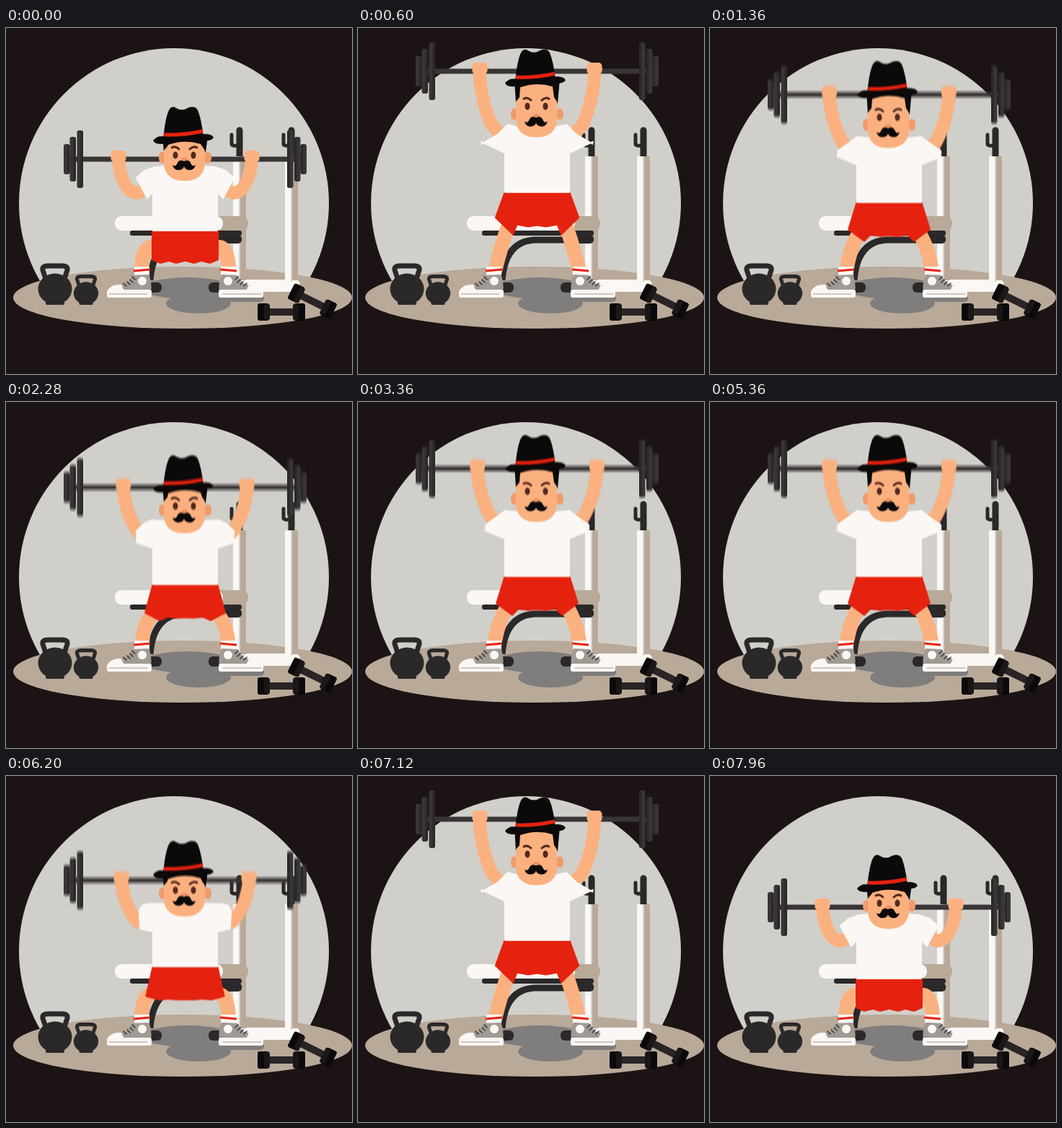
Write an HTML page with a canvas that moves like this. It is 480x480 px and loops after 8000 ms.

```html
<!DOCTYPE html>
<html lang="en">
<head>
<meta charset="utf-8">
<title>Shoulder press</title>
<style>
  html, body { margin: 0; width: 100%; height: 100%; overflow: hidden; background: #1c1314; }
  canvas { display: block; width: 100vw; height: 100vh; }
</style>
</head>
<body>
<canvas id="stage" width="480" height="480"></canvas>
<script>
const SIZE = 480, PERIOD = 2000, STEP = 40, SHUTTER = 20, SAMPLES = 8;
const MOVE = 545, DROP_START = 1176, TRAVEL = 122, AXIS = 248.5;
const C = {
  night: '#1c1314', wall: '#d1cfc9', floor: '#b8a999', shadow: '#807d7d', white: '#fbf7f4',
  iron: '#2b2829', plate: '#393435', black: '#0c090a', skin: '#fbb17f', red: '#e5220f',
  shoe: '#a09a94', brown: '#54281f'
};

const out = document.getElementById('stage').getContext('2d');
const newLayer = () => {
  const canvas = document.createElement('canvas');
  canvas.width = canvas.height = SIZE;
  return canvas.getContext('2d');
};
const backdrop = newLayer(), layer = newLayer();
let g = backdrop;

// Drawing helpers
const fill = (color, d) => { g.fillStyle = color; g.fill(new Path2D(d)); };
const line = (color, width, d, cap = 'round') => {
  g.strokeStyle = color; g.lineWidth = width; g.lineCap = cap; g.lineJoin = 'round';
  g.stroke(new Path2D(d));
};
const oval = (color, x, y, rx, ry = rx, turn = 0) => {
  g.fillStyle = color; g.beginPath(); g.ellipse(x, y, rx, ry, turn, 0, 7); g.fill();
};
const box = (color, x, y, w, h, r = 0) => {
  g.fillStyle = color; g.beginPath(); g.roundRect(x, y, w, h, r); g.fill();
};
const placed = (x, y, turn, draw) => {
  g.save(); g.translate(x, y); g.rotate(turn); draw(); g.restore();
};
const bothSides = draw => {
  draw();
  g.save(); g.translate(2 * AXIS, 0); g.scale(-1, 1); draw(); g.restore();
};

// Motion: a quick press, a hold, a quick drop, a short rest
const smooth = x => { x = Math.min(1, Math.max(0, x)); return x * x * (3 - 2 * x); };
const lift = t => {
  t = (t + PERIOD) % PERIOD;
  return smooth(t / MOVE) - smooth((t - DROP_START) / MOVE);
};

// Blends three key poses: resting, part way and nearly up
const MID = 0.31, HIGH = 0.73;
const blend = (k, low, mid, high) => {
  const [a, b, f] = k < MID ? [low, mid, k / MID] : [mid, high, (k - MID) / (HIGH - MID)];
  return a.map((v, i) => v + (b[i] - v) * f);
};
const mirrored = p => {
  const pts = [];
  for (let i = 0; i < p.length; i += 2) pts.push([p[i], p[i + 1]]);
  const other = pts.map(([x, y]) => [2 * AXIS - x, y]).reverse();
  return 'M' + pts.concat(other).map(q => q.join(' ')).join('L') + 'Z';
};

function kettlebell(x, y, s) {
  placed(x, y, 0, () => {
    g.scale(s, s);
    line(C.iron, 7, 'M-13 -14 L-17 -26 Q-18 -32 -10 -32 L10 -32 Q18 -32 17 -26 L13 -14');
    oval(C.iron, 0, 0, 23.5, 21.5);
    box(C.iron, -13, 14, 26, 8, 2);
  });
}

function dumbbell(x, y, turn) {
  placed(x, y, turn, () => {
    box('#292425', -19, -5, 38, 10);
    for (const side of [-1, 1]) {
      box(C.black, side * 25 - 8, -12, 16, 24, 3);
      box('#1b1718', side * 20 - 4, -11, 8, 22, 2);
    }
  });
}

function post(x) {
  line(C.iron, 9, `M${x + 9} 142 V180`);
  line(C.iron, 5, `M${x - 2} 148 V161 Q${x - 2} 164 ${x + 8} 163`);
  box(C.white, x, 178, 9, 174);
  box('#d8d3cb', x + 8, 178, 2, 174);
  box(C.floor, x + 10, 178, 8, 172);
}

function drawBackdrop() {
  box(C.night, 0, 0, SIZE, SIZE);
  g.save();
  g.beginPath(); g.rect(0, 0, SIZE, 374); g.clip();
  oval(C.wall, 233, 243, 215);
  g.restore();
  oval(C.floor, 245, 374, 235, 43);
  oval(C.shadow, 252, 361, 64, 15);
  oval(C.shadow, 267, 382, 45, 14);
  box(C.shadow, 300, 369, 58, 11, 5);

  fill(C.white, 'M318 349 H404 L408 354 L397 366 H345 Z');
  post(315);
  post(387);

  box(C.floor, 285, 261, 51, 20, 9);
  box(C.white, 151, 261, 150, 20, 9);
  line(C.iron, 9, 'M200 350 Q204 296 245 294 H304', 'butt');
  box(C.iron, 172, 281, 155, 7, 3);
  box(C.iron, 294, 287, 33, 12, 5);

  kettlebell(68, 362, 1);
  kettlebell(111, 368, 0.73);
  dumbbell(382, 394, 0);
  dumbbell(425, 379, 0.46);
  bothSides(() => box(C.iron, 186, 353, 30, 14, 6));
}

function barbell(y) {
  box(C.plate, 84, y - 3.5, 328, 7);
  bothSides(() => {
    [[80, 42], [88.5, 62], [98.5, 80]].forEach(([x, h]) => {
      box(C.plate, x, y - h / 2, 8.5, h, 3);
      box(C.iron, x + 5, y - h / 2 + 1, 3.5, h - 2, 2);
    });
  });
}

function shoe() {
  box(C.white, 178, 331, 21, 16);
  line(C.red, 3, 'M177 337 L200 335', 'butt');
  fill(C.shoe, 'M176 343 L198 342 Q203 352 201 367 H146 Q158 356 168 354 Z');
  fill(C.white, 'M141 364 Q146 355 160 356 L164 365 Z');
  box(C.white, 140, 363, 62, 11, 3);
  line(C.shoe, 1, 'M143 369 H196');
  line('#3c3838', 1.6, 'M175 345 l4 4 M172 349 l4 4 M168 352 l4 4 M163 354 l4 4');
  oval(C.white, 189, 351, 6);
}

function head(chin, eyes, hat) {
  const brow = 158 + hat, cheek = 190 + chin;
  bothSides(() => oval('#f19a6b', 217, 180 + chin, 5, 8));
  fill(C.black, `M217 ${brow - 8} H280 L277 ${172 + eyes} H219 Z`);
  fill(C.skin, `M219 ${170 + eyes} L224 ${164 + eyes} L225 ${brow + 4} Q248 ${brow - 4} 270 ${brow + 3}
    L272 ${164 + eyes} L276 ${170 + eyes} V${cheek} Q273 ${212 + chin} 247.5 ${212 + chin}
    Q222 ${212 + chin} 219 ${cheek} Z`);
  for (const side of [-1, 1]) {
    const x = 247.5 + side * 12.5;
    line(C.brown, 3, `M${x - 5} ${167 + eyes + side} Q${x} ${163 + eyes} ${x + 5} ${167 + eyes - side}`);
    oval(C.brown, x, 176.5 + eyes, 3.5, 5);
  }
  oval('#ee9065', 247.5, 183 + chin, 5, 3.5);
  placed(247, 190 + chin, 0, () => fill(C.black,
    'M0 -5 Q-7 -9 -10 -1 Q-12 3 -16 0 Q-14 8 -6 7 Q-1 6 0 2 Q1 6 6 7 Q14 8 16 0 Q12 3 10 -1 Q7 -9 0 -5Z'));

  placed(0, hat, 0, () => {
    fill(C.black, 'M218 154 Q221 124 226 114 Q230 107 236 111 Q244 116 252 111 Q262 107 266 114 Q271 126 274 151 Z');
    line(C.red, 5, 'M219 148 Q246 149 273 143', 'butt');
    fill(C.black, 'M204 156 Q211 148 219 151 Q250 153 275 147 Q286 147 288 152 Q284 158 268 156 Q242 155 222 160 Q207 163 204 156Z');
  });
}

function scene(t) {
  const k = lift(t), late = lift(t - 90);
  const barY = 182 - TRAVEL * k, handX = 156 + 13 * k, bodyY = -54 * k;
  g.drawImage(backdrop.canvas, 0, 0);
  barbell(barY);

  const leg = blend(k, [205, 304, 188, 302, 188, 338], [203, 302, 188, 305, 188, 338], [206, 286, 194, 305, 189, 338]);
  const arm = blend(k, [162, 228, 182, 229, 198, 222], [166, 185, 183, 202, 192, 197], [168, 130, 184, 160, 196, 168]);
  bothSides(() => {
    line(C.skin, 20, `M${leg[0]} ${leg[1]} Q${leg.slice(2).join(' ')}`, 'butt');
    shoe();
    line(C.skin, 18, `M${handX} ${barY + 3} Q${arm.slice(0, 4).join(' ')} L${arm.slice(4).join(' ')}`, 'butt');
    box(C.skin, handX - 10.5, barY - 12, 21, 16, 5);
  });

  fill(C.red, mirrored(blend(k,
    [202, 280, 202, 322, 214, 327, 226, 324, 236, 327, 248, 324],
    [203, 263, 193, 306, 212, 311, 226, 310, 236, 311, 248, 311],
    [203, 241, 191, 280, 214, 297, 223, 288, 236, 290, 248, 289])));
  const shirt = mirrored(blend(k,
    [222, 192, 207, 193, 192, 198, 181, 208, 196, 236, 204, 227, 204, 281],
    [222, 177, 198, 177, 189, 179, 185, 187, 186, 212, 204, 216, 204, 264],
    [222, 153, 204, 151, 192, 160, 177, 171, 177, 179, 204, 190, 204, 242]));
  fill(C.white, shirt);
  line(C.white, 2, shirt);
  head(bodyY - 6.5 * late, bodyY - 14 * late, bodyY - 26 * late);
}

function render(t) {
  g = layer;
  const moving = Math.abs(lift(t) - lift(t - 120)) + Math.abs(lift(t + 10) - lift(t - 10)) > 1e-4;
  const count = moving ? SAMPLES : 1;
  for (let i = 0; i < count; i++) {
    // Averaging moments inside the shutter time gives motion blur
    scene(t + ((i + 0.5) / count - 0.5) * SHUTTER);
    out.globalAlpha = 1 / (i + 1);
    out.drawImage(layer.canvas, 0, 0);
  }
}

drawBackdrop();
const start = performance.now();
let shown = -1;
function frame() {
  const t = Math.floor((performance.now() - start) / STEP) * STEP % PERIOD;
  if (t !== shown) render(shown = t);
  requestAnimationFrame(frame);
}
frame();
</script>
</body>
</html>
```
